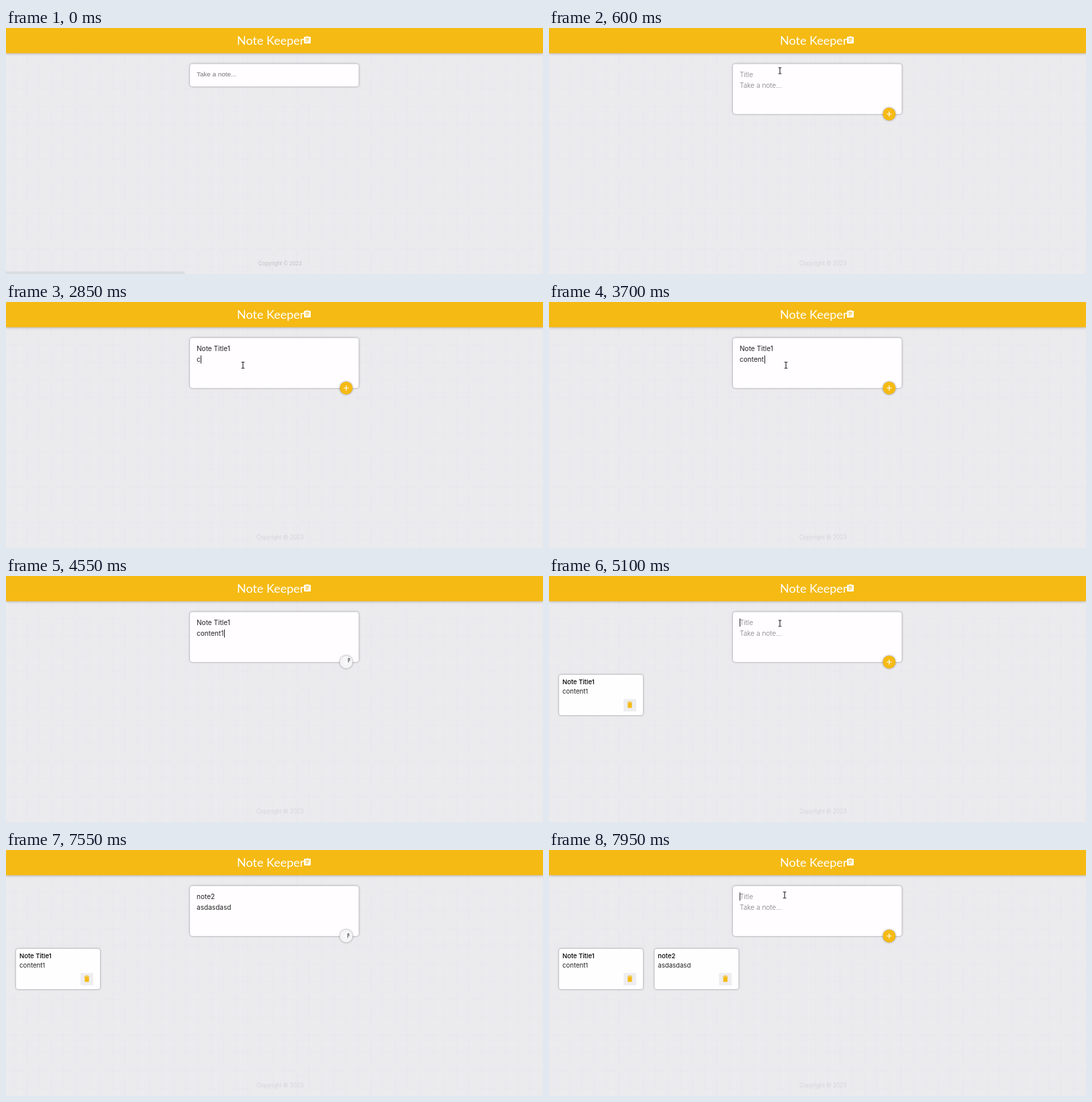
An HTML page for the animation above (8 s loop, 800 px wide and 366 px high).

```html
<!DOCTYPE html>
<html lang="en">
<head>
<meta charset="utf-8">
<title>Note Keeper</title>
<style>
  html, body { margin: 0; width: 100%; height: 100%; overflow: hidden; background: #ebeaed; }
  svg { display: block; width: 800px; height: 366px; }
  text { font-family: Inter, "Open Sans", sans-serif; font-size: 10.1px; fill: #222; }
  .plain { font-family: "Liberation Sans", Arial, sans-serif; }
  .hint { fill: #7d7b80; font-weight: 300; }
  .brand { font-family: Lato, sans-serif; font-size: 18px; fill: #fff; }
  .foot { font-size: 8.3px; fill: #cfced2; text-anchor: middle; font-weight: 300; }
  .foot.plain { fill: #c3c2c6; font-weight: 400; }
  .head { font-size: 9.5px; font-weight: 500; fill: #000; }
  .body { font-size: 9.6px; }
  .soft { filter: drop-shadow(0 .8px 1.4px rgba(100, 100, 100, .75)); }
</style>
</head>
<body>
<svg viewBox="0 0 800 366">
  <defs>
    <pattern id="paper" width="36.6" height="53" patternUnits="userSpaceOnUse">
      <path d="M12.5 0V40M31 14V53M0 10.5H30M8 36.5H36" fill="none" stroke="#e5e4e8" stroke-opacity=".55"/>
      <path d="M20.5 4V53M0 23.5H36" fill="none" stroke="#efeef1" stroke-opacity=".6"/>
    </pattern>
    <g id="card">
      <rect class="soft" x="15" y="147" width="125" height="60" rx="3.5" fill="#fffeff"/>
      <rect x="111" y="183" width="19" height="18.5" rx="1" fill="#eeedf0"/>
      <path transform="translate(114.2 185.3) scale(.52)" fill="#f5ba13"
        d="M6 19c0 1.1.9 2 2 2h8c1.1 0 2-.9 2-2V7H6zM19 4h-3.5l-1-1h-5l-1 1H5v2h14z"/>
    </g>
  </defs>
  <rect width="800" height="366" fill="#ebeaed"/>
  <rect width="800" height="366" fill="url(#paper)"/>
  <rect width="800" height="37.5" fill="#f5ba13" style="filter:drop-shadow(0 0 2px rgba(0,0,0,.35))"/>
  <text class="brand" x="344" y="24.5">Note Keeper</text>
  <path transform="translate(442.3 11.4) scale(.555)" fill="#fff"
    d="M19 3h-4.18C14.4 1.84 13.3 1 12 1c-1.3 0-2.4.84-2.82 2H5c-1.1 0-2 .9-2 2v14c0 1.1.9 2 2 2h14c1.1 0 2-.9 2-2V5c0-1.1-.9-2-2-2m-7 0c.55 0 1 .45 1 1s-.45 1-1 1-1-.45-1-1 .45-1 1-1m2 14H7v-2h7zm3-4H7v-2h10zm0-4H7V7h10z"/>

  <rect id="form" class="soft" x="274" y="53.5" width="251.5" height="34" rx="4" fill="#fffdff"/>
  <text id="title" x="284" y="73"></text>
  <text id="note" x="284" y="89.5"></text>
  <path id="caret" d="M0 0V12" stroke="#222" stroke-width="1"/>
  <g id="add">
    <circle id="disc" class="soft" r="9.5"/>
    <path d="M-3.8 0H3.8M0-3.8V3.8" stroke="#fff" stroke-width="1.2"/>
  </g>

  <g id="card1">
    <use href="#card"/>
    <text class="head" x="20" y="161">Note Title1</text>
    <text class="body" x="20" y="175.3">content1</text>
  </g>
  <g id="card2" transform="translate(142.3 0)">
    <use href="#card"/>
    <text class="head" x="20" y="161">note2</text>
    <text class="body" x="20" y="175.3">asdasdasd</text>
  </g>

  <text id="foot" x="408.2" y="353">Copyright © 2023</text>
  <path id="status" d="M0 362.3H264Q266 362.3 266 364.3V366H0Z" fill="#d9dce0"/>

  <g id="beam" fill="none">
    <path d="M-2.3-4.5H-.7L0-4 .7-4.5H2.3M0-4V4M-2.3 4.5H-.7L0 4 .7 4.5H2.3" stroke="#222" stroke-width="1.1"/>
  </g>
  <path id="arrow" d="M0 0V9.2L2.1 7.3 3.5 10.5 4.9 9.9 3.5 6.8H6.3Z" fill="#fff" stroke="#333" stroke-width=".8"/>
  <path id="hand" fill="#fff" stroke="#222" stroke-width=".8" stroke-linejoin="round"
    d="M-.9 6.6V.8Q0-.6 .9 .8V4.4Q2-.2+4.4Q2 3.6 2.5 4.7 3.6 4 4.1 5.2 5.4 4.8 5.4 6.2V8.6L4.4 11.6H-.2L-3.2 7.6Q-3.2 6-2 6.3Z"/>
</svg>
<script>
const LOOP = 8000, STEP = 50;
const $ = id => document.getElementById(id);

// [time, text]
const titles = [[0, ""], [1000, "Note T"], [1100, "Note Title"], [1700, "Note Title1"], [4600, ""],
  [5300, "n"], [5400, "not"], [5500, "note"], [5700, "note2"], [7600, ""]];
const notes = [[0, ""], [2750, "c"], [2900, "co"], [2950, "con"], [3050, "cont"], [3100, "conte"],
  [3650, "conten"], [3700, "content"], [3950, "content1"], [4600, ""], [6600, "asdasdasd"], [7600, ""]];

// [time, field holding the caret]
const carets = [[0, ""], [1700, "title"], [1850, ""], [2250, "note"], [2500, ""], [2750, "note"],
  [3450, ""], [3650, "note"], [4600, ""], [4900, "title"], [5850, ""], [6150, "note"], [6450, ""],
  [6600, "note"], [6950, ""], [7800, "title"]];

// [time, pointer, x, y, glide to the next entry]
const moves = [[0, ""], [400, "arrow", 709, 136, 1], [500, "arrow", 400, 47],
  [550, "beam", 344, 63.5], [650, "beam", 331, 67.5], [800, ""],
  [1700, "beam", 331, 70, 1], [1950, "beam", 342, 94], [2200, "beam", 348, 94], [2250, "beam", 353, 94],
  [4200, "beam", 366, 96, 1], [4350, "arrow", 470, 116, 1], [4450, "hand", 511, 122],
  [4600, "beam", 361, 70], [5100, "beam", 344, 70.5], [5150, "beam", 331, 65],
  [5700, "beam", 331, 65, 1], [6150, "beam", 361, 92],
  [6600, "arrow", 602, 138.5], [6650, "arrow", 584, 135], [6800, "arrow", 552, 136],
  [6950, "arrow", 533, 136], [7100, "arrow", 524, 131],
  [7300, "arrow", 521, 129, 1], [7400, "hand", 510, 124],
  [7650, "arrow", 492, 112, 1], [7750, "beam", 430, 88, 1], [7950, "beam", 351, 67]];

const hovers = [[4450, 4600], [7400, 7650]];

const indexAt = (list, t) => list.findLastIndex(e => e[0] <= t);
const valueAt = (list, t) => list[indexAt(list, t)][1];
const show = (id, on) => $(id).setAttribute("display", on ? "inline" : "none");
const mix = (a, b, k) => a + (b - a) * k;

function setField(id, value, hint, cls) {
  const el = $(id);
  el.textContent = value || hint;
  el.setAttribute("class", value ? "" : cls);
}

function drawCaret(t) {
  const id = valueAt(carets, t);
  show("caret", id);
  if (!id) return;
  const el = $(id), typed = valueAt(id === "title" ? titles : notes, t);
  const x = typed ? 284.5 + el.getComputedTextLength() : 284.5;
  $("caret").setAttribute("transform", `translate(${Math.round(x) + .5 - (typed ? 0 : 1)} ${id === "title" ? 63.3 : 79.5})`);
}

function drawPointer(t) {
  const i = indexAt(moves, t), [start, kind, x, y, glide] = moves[i];
  for (const id of ["arrow", "beam", "hand"]) show(id, id === kind);
  if (!kind) return;
  let px = x, py = y;
  if (glide) {
    const [end, , x2, y2] = moves[i + 1], k = (t - start) / (end - start);
    px = mix(x, x2, k);
    py = mix(y, y2, k);
  }
  $(kind).setAttribute("transform", `translate(${px} ${py})`);
}

function drawButton(t) {
  const hover = hovers.find(([a, b]) => t >= a && t < b);
  const k = hover ? Math.min(1, (t - hover[0] + STEP) / 150) : 0;
  const rgb = [[245, 244], [186, 243], [19, 245]].map(([a, b]) => Math.round(mix(a, b, k)));
  $("disc").setAttribute("fill", `rgb(${rgb})`);
  $("add").setAttribute("transform", `translate(506.8 128) scale(${t < 600 ? .6 : 1})`);
}

function draw(time) {
  const t = Math.floor(time / STEP) * STEP;
  const loaded = t >= 150, open = t >= 550;
  $("form").setAttribute("height", open ? 74.5 : loaded ? 34.5 : 33.5);
  $("foot").setAttribute("class", loaded ? "foot" : "foot plain");
  show("status", !loaded);
  show("title", open);
  show("add", open);
  setField("title", valueAt(titles, t), "Title", "hint");
  setField("note", valueAt(notes, t), "Take a note...", loaded ? "hint" : "plain");
  $("note").setAttribute("y", open ? 89.3 : loaded ? 72.6 : 72.2);
  $("note").style.fontSize = loaded ? "" : "9.9px";
  $("note").style.fill = loaded ? "" : "#757575";
  show("card1", t >= 4600);
  show("card2", t >= 7600);
  drawButton(t);
  drawCaret(t);
  drawPointer(t);
}

const begin = performance.now();
function tick() {
  draw((performance.now() - begin) % LOOP);
  requestAnimationFrame(tick);
}
tick();
</script>
</body>
</html>
```
